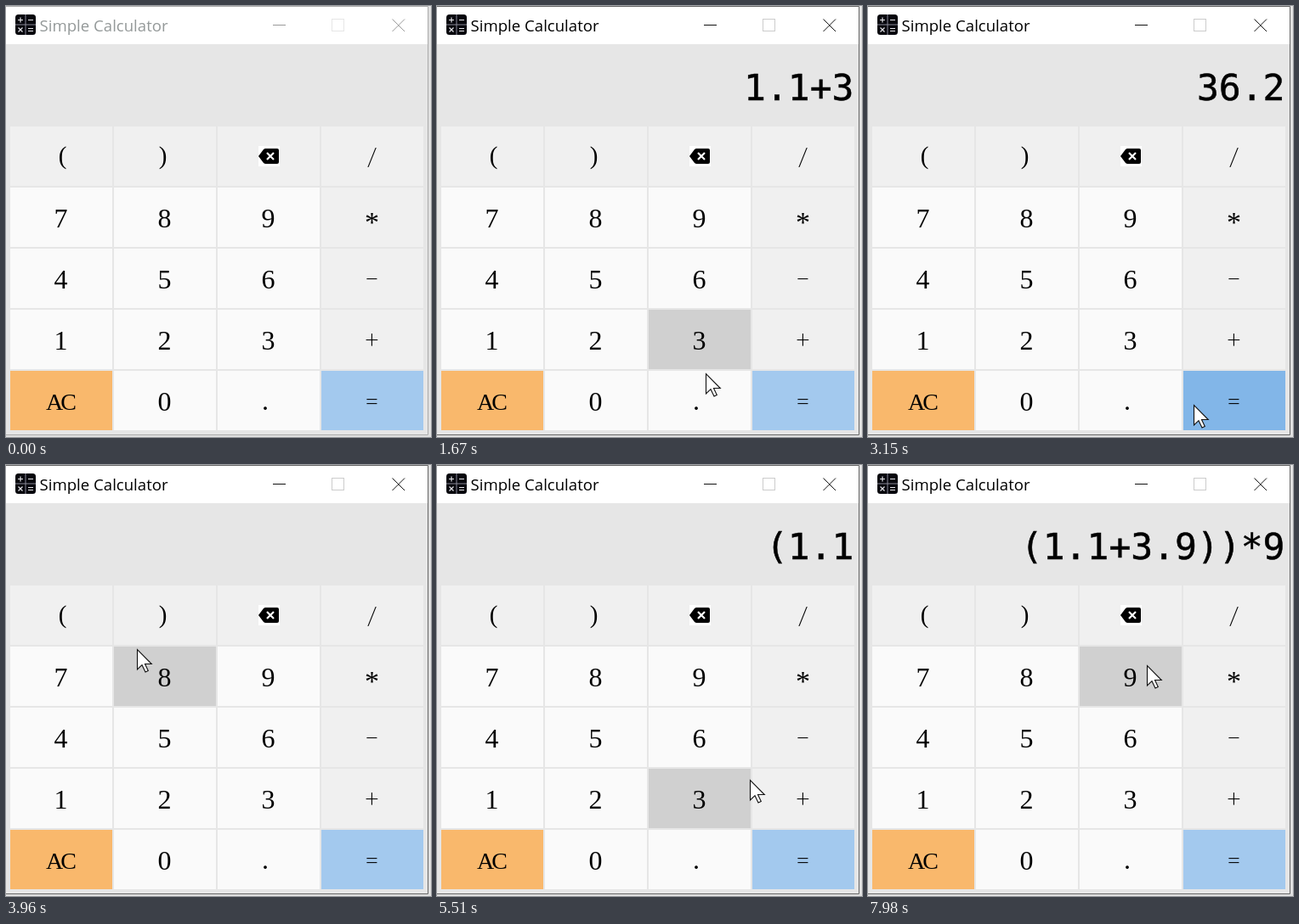
An HTML page that plays this animation: 500 by 508 pixels, repeating every 8 s.

```html
<!DOCTYPE html>
<html lang="en">
<head>
<meta charset="utf-8">
<title>Simple Calculator</title>
<style>
  html, body { margin: 0; width: 100%; height: 100%; overflow: hidden; background: #ededed; }
  svg { display: block; width: 500px; height: 508px; }
  text { user-select: none; }
  .title { font: 18.6px "Open Sans", "Noto Sans", sans-serif; }
  .label { font-family: "Liberation Serif", "Noto Serif", serif; text-anchor: middle; }
  .sign { font-family: Lato, Roboto, sans-serif; font-weight: 300; text-anchor: middle; }
  .display { font: 43px "DejaVu Sans Mono", "Noto Sans Mono", monospace; text-anchor: end; stroke: #000; stroke-width: .5; }
</style>
</head>
<body>
<svg viewBox="0 0 500 508">
  <rect width="500" height="508" fill="#f0f0f0"/>
  <rect x="497" width="3" height="508" fill="#e0e0e0"/>
  <rect y="506" width="500" height="2" fill="#e0e0e0"/>
  <rect width="496" height="505" fill="#e6e6e6"/>
  <rect width="496" height="45" fill="#fff"/>
  <path id="frame" d="M0 .5H496.5V505.5H0" fill="none"/>

  <rect x="11" y="10" width="24" height="24" rx="3.5" fill="#05050c"/>
  <path d="M23 10V34M11 22H35" stroke="#8a8a96"/>
  <path d="M14 16.5H20M17 13.5V19.5M26 16.5H32M14.5 25.5L19.5 30.5M19.5 25.5L14.5 30.5M26 26.5H32M26 29.5H32"
        stroke="#e4e4e8" stroke-width="1.2"/>

  <text id="title" class="title" x="39.5" y="29.5">Simple Calculator</text>
  <path id="controls" d="M314 22.5H329M454.5 15.5L469 30M469 15.5L454.5 30" fill="none"/>
  <rect id="maximise" x="383.5" y="15.5" width="14" height="14" fill="none"/>

  <text id="display" class="display" x="490.5" y="111"></text>
  <g id="keys"></g>
  <path id="cursor" d="M-.5 .5V24L5 18.7L9 27L12.3 25.4L8.5 17.5H16.3Z" fill="#fff" stroke="#111" stroke-width="1.1"/>
  <circle id="halo" r="18" fill="#ff0" fill-opacity=".5"/>
</svg>
<script>
const LOOP = 8000;
const RELEASE = 80, HALO = 110, HOVER_LAG = 12;
const NS = "http://www.w3.org/2000/svg";
const $ = id => document.getElementById(id);

function add(parent, tag, attrs) {
  const node = document.createElementNS(NS, tag);
  for (const name in attrs) node.setAttribute(name, attrs[name]);
  return parent.appendChild(node);
}

const ROWS = [["(", ")", "del", "/"], ["7", "8", "9", "*"], ["4", "5", "6", "-"], ["1", "2", "3", "+"], ["AC", "0", ".", "="]];

// font size, offset from the key's centre, baseline inside the key
const SIGN = [29, -.5, 46];
const GLYPHS = {
  "/": SIGN, "-": SIGN, "+": SIGN, "=": SIGN,
  "(": [29, 1.5, 44], ")": [29, -2.5, 44], "*": [34, -.5, 52],
  ".": [32, -4, 46], "AC": [28, -1.5, 46]
};
const GREY = { hover: "#d0d0d0", down: "#bababa" };

function colours(label) {
  if (label === "AC") return { base: "#f9b86c", hover: "#f5a544", down: "#e8932c" };
  if (label === "=") return { base: "#a3c9ee", hover: "#82b6e8", down: "#659fd9" };
  return { base: /[0-9.]/.test(label) ? "#fafafa" : "#f0f0f0", ...GREY };
}

const keys = ROWS.flatMap((row, r) => row.map((label, c) => {
  const x = 5 + c * 122, y = 142 + r * 72;
  const tone = colours(label);
  const rect = add($("keys"), "rect", { x, y, width: 120, height: 70, fill: tone.base });
  if (label === "del") {
    add($("keys"), "rect", { x: 297, y: 165, width: 25, height: 24, fill: "#fff" });
    add($("keys"), "path", { d: "M297 177L303 169Q304 168 305.5 168H319Q321 168 321 170V184Q321 186 319 186H305.5Q304 186 303 185Z" });
    add($("keys"), "path", { d: "M307 173L315 181M315 173L307 181", stroke: "#fff", "stroke-width": 2.2 });
  } else {
    const glyph = GLYPHS[label] || [32, -.5, 47];
    const [size, dx, base] = glyph;
    const style = glyph === SIGN ? "sign" : "label";
    const text = add($("keys"), "text", { class: style, x: x + 60 + dx, y: y + base, "font-size": size });
    if (label === "AC") text.setAttribute("letter-spacing", -3);
    text.textContent = label === "-" ? "\u2212" : label;
  }
  return { x, y, rect, tone };
}));

// time, x, y, key, and optionally when the pointer leaves and arrives
const PRESSES = [
  [330, 72, 392, "1"], [620, 300, 462, "."], [850, 75, 398, "1"],
  [1300, 402, 394, "+"], [1530, 325, 396, "3"], [1740, 310, 462, "."],
  [2010, 320, 248, "9"], [2260, 401, 246, "*"], [2480, 333, 250, "9"],
  [2860, 412, 481, "=", 3100], [3610, 85, 455, "AC", 3710, 3430],
  [4190, 80, 182, "("], [4540, 72, 394, "1"], [4790, 300, 460, "."],
  [5030, 75, 396, "1", 5270], [5620, 402, 393, "+"], [5880, 325, 396, "3"],
  [6190, 308, 458, "."], [6440, 318, 228, "9", 6585],
  [6700, 200, 184, ")"], [7060, 200, 184, ")", 7370],
  [7590, 403, 240, "*"], [7860, 329, 236, "9", LOOP]
].map(([t, x, y, key, leave = t + 95, arrive = t - 30]) => ({ t, x, y, key, leave, arrive }));

// passing points keep their speed, resting points have none
const path = [
  { t: 70, x: 110, y: 520, rest: true },
  { t: 1040, x: 162, y: 399 },
  { t: 3270, x: 235, y: 425 },
  { t: 3960, x: 155, y: 218 },
  { t: 5510, x: 368, y: 371 },
  ...PRESSES.flatMap(({ x, y, leave, arrive }) => [
    { t: arrive, x, y, rest: true }, { t: leave, x, y, rest: true }
  ])
].sort((a, b) => a.t - b.t);

function speed(i, axis) {
  if (path[i].rest) return 0;
  const a = path[i - 1], b = path[i + 1];
  return (b[axis] - a[axis]) / (b.t - a.t);
}

function pointer(t) {
  const i = path.findIndex(p => p.t > t) - 1;
  if (i < 0) return { x: path[0].x, y: path[0].y };
  const a = path[i], b = path[i + 1], span = b.t - a.t;
  const u = (t - a.t) / span, u2 = u * u, u3 = u2 * u;
  const at = axis =>
    (2 * u3 - 3 * u2 + 1) * a[axis] + (3 * u2 - 2 * u3) * b[axis] +
    span * ((u3 - 2 * u2 + u) * speed(i, axis) + (u3 - u2) * speed(i + 1, axis));
  return { x: at("x"), y: at("y") };
}

function expression(t) {
  let text = "";
  for (const { t: start, key } of PRESSES) {
    if (start + RELEASE > t) break;
    text = key === "AC" ? "" : key === "=" ? "36.2" : text + key;
  }
  return text;
}

function draw(t) {
  const p = pointer(t), h = pointer(t - HOVER_LAG);
  const press = PRESSES.find(k => t >= k.t && t < k.t + HALO);
  const down = press && t < press.t + RELEASE;
  for (const { x, y, rect, tone } of keys) {
    const over = h.x >= x && h.x < x + 120 && h.y >= y && h.y < y + 70;
    rect.setAttribute("fill", over ? (down ? tone.down : tone.hover) : tone.base);
  }
  const active = t >= PRESSES[0].t;
  $("title").setAttribute("fill", active ? "#000" : "#949999");
  $("controls").setAttribute("stroke", active ? "#111" : "#999");
  $("maximise").setAttribute("stroke", active ? "#ccc" : "#e6e6e6");
  $("frame").setAttribute("stroke", active ? "#666" : "#aaa");
  $("display").textContent = expression(t);

  const place = `translate(${Math.round(p.x)} ${Math.round(p.y)})`;
  $("cursor").setAttribute("transform", place);
  $("halo").setAttribute("transform", place);
  $("halo").setAttribute("visibility", press ? "visible" : "hidden");
}

const begin = performance.now();
function tick() {
  draw((performance.now() - begin) % LOOP);
  requestAnimationFrame(tick);
}
tick();
</script>
</body>
</html>
```
